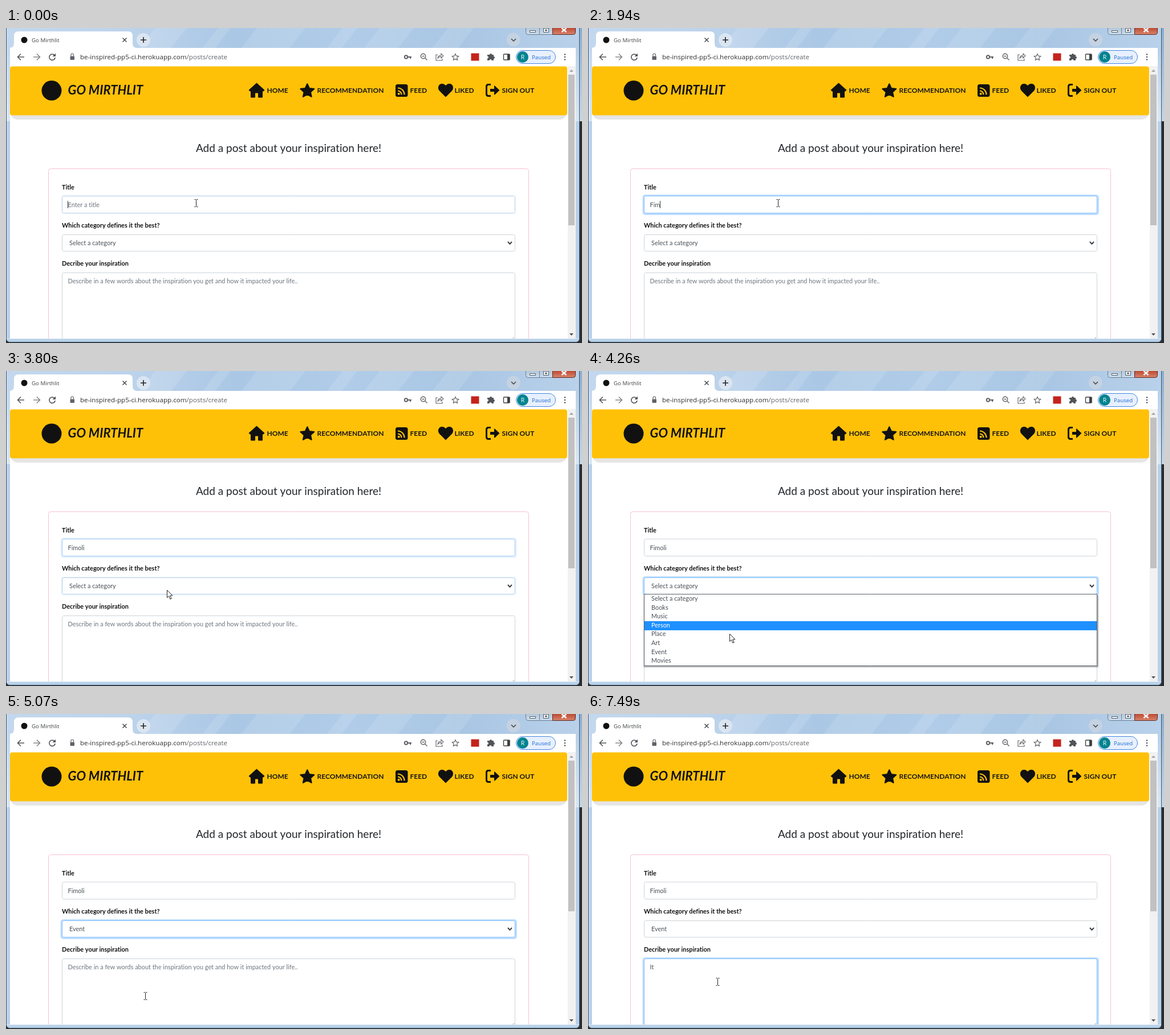
Animation of 1010 by 554 pixels, one loop 7990 ms. Source, as an HTML page with a canvas:

```html
<!DOCTYPE html>
<html lang="en">
<head>
<meta charset="utf-8">
<title>Go Mirthlit</title>
<style>
html, body { margin: 0; width: 100%; height: 100%; overflow: hidden; background: #fff; }
canvas { display: block; width: 1010px; height: 554px; }
</style>
</head>
<body>
<canvas id="stage"></canvas>
<script>
const W = 1010, H = 554, LOOP = 7990;
const canvas = document.getElementById('stage');
const c = canvas.getContext('2d');
const scale = window.devicePixelRatio || 1;
canvas.width = W * scale;
canvas.height = H * scale;

const PAGE = 'Lato, "Open Sans", sans-serif';
const UI = '"Open Sans", "Noto Sans", sans-serif';
const BODY = '10.9px ' + PAGE;
const LABEL = 'bold 10.9px ' + PAGE;
const NAV = 'bold 12px ' + PAGE;
const INK = '#495057', HINT = '#6c757d';

const OPTIONS = ['Select a category', 'Books', 'Music', 'Person', 'Place', 'Art', 'Event', 'Movies'];
const EVENT_NAME = 'Fimoli';

// Each list holds [time, value...] entries; the last one reached applies.
const TITLE_KEYS = [[0, 0], [1120, 1], [1500, 2], [1940, 3], [2120, 4], [2320, 5], [2510, 6]];
const TITLE_CARET = [[0, 1], [510, 0], [1000, 1], [3080, 0], [3560, 1], [3750, 0]];
const TITLE_FOCUS = [[0, .3], [50, .65], [120, 1], [3750, .6], [3810, .25], [3880, 0]];
const SELECT_FOCUS = [[0, 0], [3750, .4], [3810, .75], [3880, 1], [5680, .6], [5740, .25], [5800, 0]];
const AREA_FOCUS = [[0, 0], [5680, .4], [5740, .75], [5800, 1]];
const AREA_TEXT = [[0, ''], [6410, 'I'], [6680, 'It'], [6930, 'It ']];
const AREA_CARET = [[0, 0], [5680, 1], [6230, 0], [6410, 1], [7490, 0]];
const HOVER_ROW = [[0, 0], [4200, 1], [4260, 3], [4330, 4], [4390, 5], [4450, 6]];
const POINTER = [
  [3560, 282, 385], [4140, 276, 400], [4200, 260, 434], [4260, 248, 462], [4330, 245, 478],
  [4390, 243, 487], [4450, 244, 493], [4500, 245, 496], [5310, 241, 488], [5370, 233, 477], [5430, 228, 471]
];

function at(list, t) {
  let found = list[0];
  for (const item of list) if (item[0] <= t) found = item;
  return found;
}
const val = (list, t) => at(list, t)[1];

function box(x, y, w, h, r, fill, stroke, width = 1) {
  c.beginPath();
  c.roundRect(x, y, w, h, r);
  if (fill) { c.fillStyle = fill; c.fill(); }
  if (stroke) { c.strokeStyle = stroke; c.lineWidth = width; c.stroke(); }
}

function disc(x, y, r, fill) {
  c.beginPath();
  c.arc(x, y, r, 0, Math.PI * 2);
  c.fillStyle = fill;
  c.fill();
}

function text(s, x, y, font, color, align = 'left') {
  c.font = font;
  c.fillStyle = color;
  c.textAlign = align;
  c.fillText(s, x, y);
}

// SVG path drawn with its origin at x, y.
function shape(d, x, y, fill, stroke, width = 1.5) {
  const p = new Path2D(d);
  c.save();
  c.translate(x, y);
  if (fill) { c.fillStyle = fill; c.fill(p, 'evenodd'); }
  if (stroke) { c.strokeStyle = stroke; c.lineWidth = width; c.stroke(p); }
  c.restore();
}

function star(x, y, r, fill, stroke) {
  c.beginPath();
  for (let i = 0; i < 10; i++) {
    const a = i * Math.PI / 5 - Math.PI / 2, k = i % 2 ? r * .48 : r;
    c.lineTo(x + k * Math.cos(a), y + k * Math.sin(a));
  }
  c.closePath();
  if (fill) {
    c.fillStyle = c.strokeStyle = fill;
    c.lineWidth = 2;
    c.lineJoin = 'round';
    c.fill();
  } else {
    c.strokeStyle = stroke;
    c.lineWidth = 1.2;
  }
  c.stroke();
  c.lineJoin = 'miter';
}

function gradient(x0, y0, x1, y1, stops) {
  const g = c.createLinearGradient(x0, y0, x1, y1);
  stops.forEach(([p, color]) => g.addColorStop(p, color));
  return g;
}

function drawFrame() {
  box(0, 0, W, H, 0, '#2b2d2f');
  box(1005, 0, 5, 164, 0, gradient(0, 0, 0, 164, [[0, '#8caecf'], [1, '#c5d6e6']]));
  box(.5, -8, 1005, 560.5, 6, '#b9d1ea', '#40566c');
  box(1, 0, 1004, 36, 0, gradient(0, 0, 1005, 0, [
    [0, '#c3d8ee'], [.22, '#bcd3eb'], [.4, '#aac7e5'], [.6, '#b0cce8'], [.8, '#a9c6e4'], [1, '#b9d1ea']
  ]));
  c.save();
  c.beginPath();
  c.rect(1, 0, 1004, 36);
  c.clip();
  for (const [x, w] of [[262, 55], [372, 22], [440, 85], [590, 26], [655, 60], [775, 45]]) {
    shape(`M${x} 0h${w}l-28 36h${-w}z`, 0, 0, 'rgba(255,255,255,.12)');
  }
  c.restore();
  box(1, 36, 6, 128, 0, gradient(0, 36, 0, 164, [[0, '#c3d8ee'], [1, '#dbe7f3']]));
  box(999, 36, 6, 128, 0, gradient(0, 36, 0, 164, [[0, '#b9d1ea'], [1, '#dbe7f3']]));
  box(1, 546, 1004, 1, 0, '#dce8f4');

  // Window buttons
  const glass = gradient(0, 0, 0, 11, [[0, '#b3c7db'], [1, '#cbdcec']]);
  box(911.5, -5, 24, 16.5, [0, 0, 0, 4], glass, '#6b7f94');
  box(935.5, -5, 23, 16.5, 0, glass, '#6b7f94');
  box(958.5, -5, 40, 16.5, [0, 0, 4, 0], gradient(0, 0, 0, 11, [[0, '#bd4a33'], [1, '#d9826a']]), '#5b2b26');
  box(918.5, 4.5, 10, 3, 0, '#fff', '#4c5a68');
  box(942.5, .5, 9, 7, 0, '#fff', '#4c5a68');
  box(945.5, 3, 3, 2, 0, '#8ea4ba', '#4c5a68');
  shape('M-4 0L4 7M4 0L-4 7', 978.5, 0, null, '#fff', 2.5);
}

function drawBrowser() {
  shape('M6 35Q14 35 14 27V14Q14 6 22 6H214Q222 6 222 14V27Q222 35 230 35Z', 0, 0, '#fff');
  disc(32, 21, 5.5, '#111');
  text('Go Mirthlit', 45, 24.5, '9.7px ' + UI, '#3c4043');
  shape('M-3.5 -3.5L3.5 3.5M3.5 -3.5L-3.5 3.5', 208, 21, null, '#3c4043', 1.4);
  disc(241, 21, 12, '#dae5f1');
  shape('M-5 0H5M0 -5V5', 241, 21, null, '#202124', 1.6);
  disc(890, 20.5, 12, '#c4d2e2');
  shape('M-4 -2L0 2L4 -2', 890, 21, null, '#3c4043', 1.5);

  box(7, 35, 992, 32, 0, '#fff');
  const gray = '#5f6368';
  shape('M6 0H-5M0 -5.5L-5.5 0L0 5.5', 26, 51, null, '#505459', 1.6);
  shape('M-6 0H5M0 -5.5L5.5 0L0 5.5', 54, 51, null, '#85898d', 1.6);
  shape('M4.2 -3A5.2 5.2 0 1 0 5.2 1', 81, 51, null, '#505459', 1.6);
  shape('M6 -6.5V-1H.5Z', 81, 51, '#505459');
  box(112.5, 49.5, 7.5, 6.5, 1, gray);
  shape('M-2.3 0V-2.2A2.3 2.3 0 0 1 2.3 -2.2V0', 116.2, 49.5, null, gray, 1.2);
  const url = '11.6px ' + UI, host = 'be-inspired-pp5-ci.herokuapp.com';
  text(host, 130, 55, url, '#303134');
  text('/posts/create', 130 + c.measureText(host).width, 55, url, '#5f6368');

  c.beginPath();
  c.arc(701.5, 51, 2.7, 0, 7);
  c.strokeStyle = gray;
  c.lineWidth = 2;
  c.stroke();
  shape('M704 51H711M709 51V54', 0, 0, null, gray, 2);
  c.beginPath();
  c.arc(731.5, 49.5, 4.2, 0, 7);
  c.lineWidth = 1.4;
  c.stroke();
  shape('M734.5 52.5L738.5 56.5M729.5 49.5H733.5', 0, 0, null, gray, 1.4);
  shape('M-3 -4H-6V6H5V3M-3 2Q-2 -3 3 -3V-6L7 -2L3 2V-1Q0 -1 -3 2Z', 760, 51, null, gray, 1.1);
  star(788, 51.5, 6, null, gray);
  box(815.5, 44.5, 14, 13, 0, '#c4231c');
  shape('M-6 -3H-2A2 2 0 1 1 2 -3H5V0A2 2 0 1 1 5 4V7H1.5A2 2 0 1 0 -2.5 7H-6V3.5A2 2 0 1 0 -6 -.5Z', 850, 50, '#505459');
  box(872.5, 46, 10.5, 10, 1, null, '#3c4043', 1.4);
  box(879, 46, 4.5, 10, 0, '#3c4043');
  box(894.5, 39.5, 69, 23, 12, '#e8f0fe', '#3f86e0');
  disc(906, 51, 10, '#00838f');
  text('R', 906, 55, '10.5px ' + UI, '#fff', 'center');
  text('Paused', 922, 54.6, '9.7px ' + UI, '#1a67d2');
  for (const y of [46.5, 51, 55.5]) disc(980, y, 1.3, '#505459');
}

function drawNav() {
  box(7, 90, 977, 71, [0, 0, 14, 14], '#e5e5e5');
  box(7, 67.5, 977, 86, 4, '#ffc107');
  disc(80, 110, 17.5, '#111');
  text('GO MIRTHLIT', 108.5, 117, 'italic bold 22px ' + PAGE, '#111');

  const ink = '#111';
  shape('M13.5 0L27 12.2L25.3 14H23.5V25H16.5V17H10.5V25H3.5V14H1.7L0 12.2Z', 426, 97, ink, ink, 1);
  star(528.3, 110.8, 12.6, ink);
  box(683, 99, 21.5, 22, 3.5, ink);
  disc(688.7, 115.8, 2, '#ffc107');
  shape('M0 -6A6.5 6.5 0 0 1 6.5 .8M0 -11A11.5 11.5 0 0 1 11.5 .8', 687, 116.5, null, '#ffc107', 2.2);
  shape('M13 23.5L2 12.5C-2 8 0 0 6.7 0C9.5 0 11.5 1.4 13 3.3C14.5 1.4 16.5 0 19.3 0C26 0 28 8 24 12.5Z', 758, 98, ink);
  shape('M9 1.5H5Q1.5 1.5 1.5 5V18Q1.5 21.5 5 21.5H9', 841, 98, null, ink, 3);
  shape('M8 9H15V4.5Q15 2.5 16.5 4L24.5 11.5L16.5 19Q15 20.5 15 18.5V14H8Z', 841, 98, ink);
  for (const [label, x] of [['HOME', 457.5], ['RECOMMENDATION', 545.5], ['FEED', 708.5], ['LIKED', 786.5], ['SIGN OUT', 869.5]]) {
    text(label, x, 114.4, NAV, '#151515');
  }
}

function field(y, h, focus) {
  const mix = (a, b) => Math.round(a + (b - a) * focus);
  if (focus) box(95.5, y - 2, 800.5, h + 5, 5, `rgba(0,123,255,${.25 * focus * focus})`);
  box(98.5, y + .5, 794, h - 1, 3, '#fff', `rgb(${mix(206, 128)},${mix(212, 189)},${mix(218, 255)})`);
}

function caret(x, y) {
  box(Math.round(x), y, 1, 13, 0, '#30353a');
}

function drawForm(t) {
  text('Add a post about your inspiration here!', 495.5, 217.5, '19px ' + PAGE, '#212529', 'center');
  box(74.5, 247.5, 842, 340, 4, null, '#f9c0cf');
  text('Title', 98, 284, LABEL, '#111');
  text('Which category defines it the best?', 98, 351, LABEL, '#111');
  text('Decribe your inspiration', 98, 417.6, LABEL, '#111');

  field(295, 31, val(TITLE_FOCUS, t));
  const typed = EVENT_NAME.slice(0, val(TITLE_KEYS, t));
  text(typed || 'Enter a title', 108.5, 314.6, BODY, typed ? INK : HINT);
  if (val(TITLE_CARET, t)) caret(108 + c.measureText(typed).width, 304);

  field(363, 30, val(SELECT_FOCUS, t));
  text(t < 5070 ? OPTIONS[0] : OPTIONS[6], 111, 381.6, BODY, INK);
  shape('M-3.5 -2L0 1.8L3.5 -2', 883.5, 378, null, '#343a40', 1.9);

  field(430, 130, val(AREA_FOCUS, t));
  const story = val(AREA_TEXT, t);
  text(story || 'Describe in a few words about the inspiration you get and how it impacted your life..',
    108.5, 448.8, BODY, story ? INK : HINT);
  if (val(AREA_CARET, t)) caret(108 + c.measureText(story).width, 439);
  shape('M0 3L4 -1', 887, 545, null, '#888', 1);
}

function drawScrollbar() {
  box(985, 67, 14, 479, 0, '#f1f1f1');
  box(986, 82, 11, 265, 0, '#c1c1c1');
  shape('M-3.5 2L0 -2L3.5 2Z', 991.5, 75, '#a3a3a3');
  shape('M-3.5 -2L0 2L3.5 -2Z', 991.5, 539, '#505050');
}

function drawMenu(t) {
  const top = 392.8, step = 15.6, hover = val(HOVER_ROW, t);
  box(97, 395, 799, 127, 2, 'rgba(0,0,0,.12)');
  box(98, 394, 796.5, 126.5, 1, 'rgba(0,0,0,.22)');
  box(98.5, 392.5, 794, 126, 0, '#fff', '#58606a');
  OPTIONS.forEach((name, i) => {
    const y = top + step * i;
    if (i === hover) box(99, Math.round(y), 793, 16, 0, '#1e90ff');
    text(name, 111, y + 11.2, BODY, i === hover ? '#fff' : INK);
  });
}

function pointerAt(t) {
  if (t < 3080) return [334, 308];
  if (t < 3560) {
    const p = (Math.floor((t - 3080) / 68.6) + 1) / 8, e = p * (2 - p);
    return [334 - 52 * e, 308 + 77 * e];
  }
  return at(POINTER, t).slice(1);
}

function drawPointer(t) {
  const [x, y] = pointerAt(t);
  const beam = y < 326 || t >= 5070;
  if (beam) {
    shape('M-3 -6.5H-1L0 -5.5L1 -6.5H3M0 -5.5V5.5M-3 6.5H-1L0 5.5L1 6.5H3', Math.round(x) - .5, Math.round(y), null, '#222', 1);
  } else {
    shape('M0 0V13.2L3.1 10.3L5.4 15.8L7.6 14.9L5.3 9.5H9.5Z', x + .5, y + .5, '#fff', '#222', 1);
  }
}

function draw(t) {
  c.setTransform(scale, 0, 0, scale, 0, 0);
  c.letterSpacing = '0.01px'; // any spacing turns ligatures off
  drawFrame();
  drawBrowser();
  c.save();
  c.beginPath();
  c.rect(7, 67, 992, 479);
  c.clip();
  box(7, 67, 992, 479, 0, '#fff');
  drawNav();
  drawForm(t);
  drawScrollbar();
  if (t >= 3880 && t < 5070) drawMenu(t);
  drawPointer(t);
  c.restore();
}

const start = performance.now();
function tick() {
  draw((performance.now() - start) % LOOP);
  requestAnimationFrame(tick);
}
tick();
</script>
</body>
</html>
```
